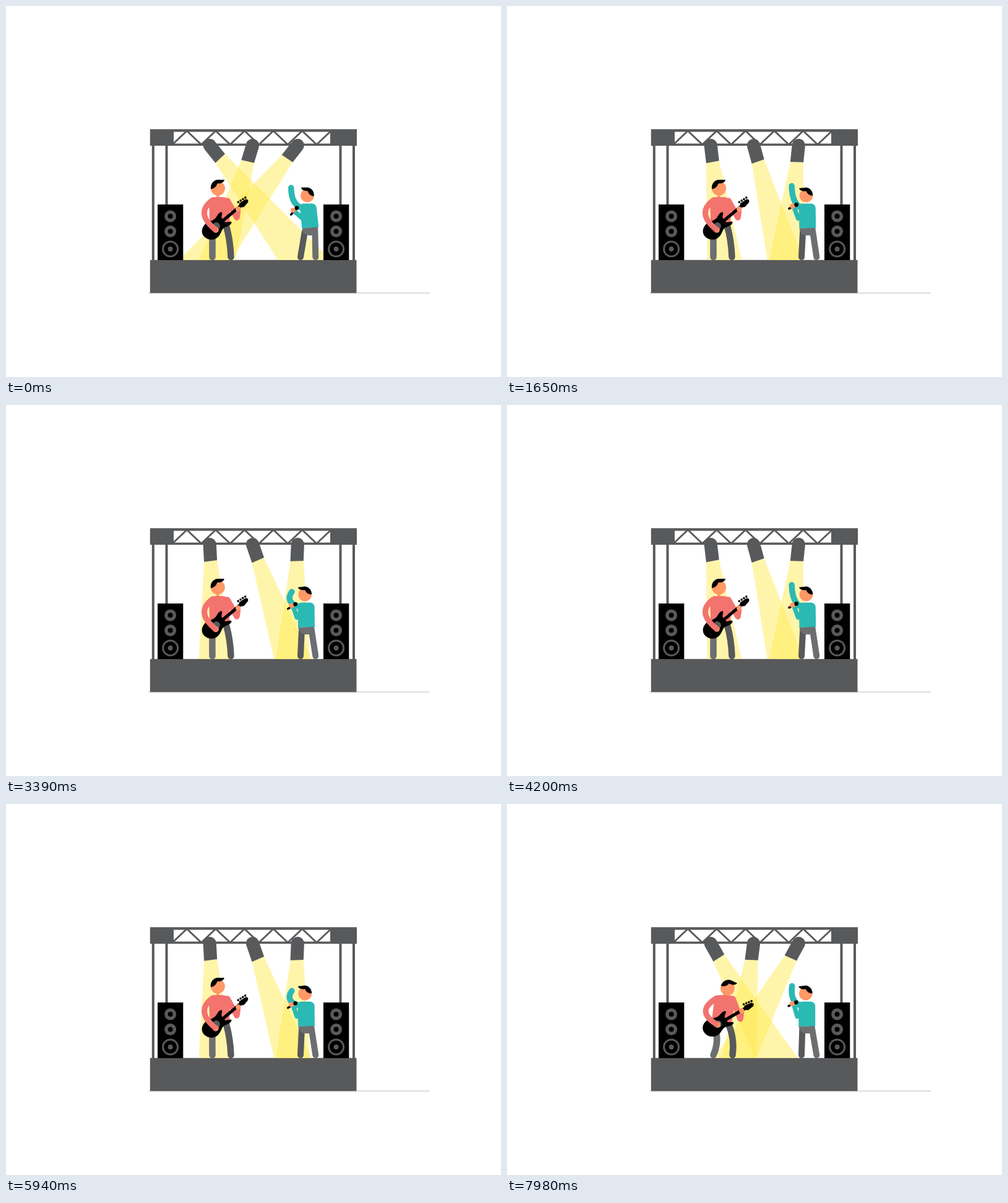
These frames come from a looping animation (800 by 600 pixels, 8000 ms). An HTML page:

```html
<!DOCTYPE html>
<html lang="en">
<head>
<meta charset="utf-8">
<title>Concert stage</title>
<style>
  html, body { margin: 0; width: 100%; height: 100%; overflow: hidden; background: #fff; }
  svg { display: block; width: 100vw; height: 100vh; }
</style>
</head>
<body>
<svg viewBox="0 0 800 600" xmlns="http://www.w3.org/2000/svg">
  <defs>
    <clipPath id="air"><rect x="233" y="200" width="334" height="211"/></clipPath>
    <path id="hair" d="M-11.5 1C-12.5-7-7-14 0-14L10.500-14C10-9.500 4-7.500-1-8C-2.500-2-7 .5-11.500 1Z"/>
  </defs>
  <path d="M231 464.200H684" stroke="#e1e1e1" stroke-width="2.400" stroke-linecap="round"/>
  <path d="M237.800 225V411M562 225V411M259.500 225V322M540.500 225V322" stroke="#58595b" stroke-width="4"/>
  <path fill="#58595b" d="M232.800 410.800H566.500V464.300H232.800Z"/>
  <path fill="#58595b" fill-rule="evenodd" d="M232.800 199.200H567V226H232.800ZM271 203.500V222.500H524V203.500Z"/>
  <path id="truss" fill="none" stroke="#58595b" stroke-width="2.800"/>
  <g id="beams" clip-path="url(#air)"></g>
  <g id="lamps"></g>
  <g id="speakers"></g>
  <g id="guitarist" fill="none" stroke-linecap="round" stroke-linejoin="round"></g>
  <g id="singer" fill="none" stroke-linecap="round" stroke-linejoin="round"></g>
</svg>
<script>
const GREY = '#58595b', LIGHT = '#6d6e70', RED = '#f3736f', TEAL = '#2bb9b4', SKIN = '#fe9867';
const LOOP = 8000, STEP = 30, BAR = 2550;

const $ = id => document.getElementById(id);
const set = (node, attrs) => { for (const k in attrs) node.setAttribute(k, attrs[k]); };

function add(parent, tag, attrs = {}) {
  const node = document.createElementNS('http://www.w3.org/2000/svg', tag);
  set(node, attrs);
  return parent.appendChild(node);
}

const dot = (g, r, fill) => add(g, 'circle', { r, fill });
const stroke = (g, color, width) => add(g, 'path', { stroke: color, 'stroke-width': width });
const place = (node, x, y, turn = 0) =>
  set(node, { transform: `translate(${x} ${y}) rotate(${turn})` });
const line = (node, ...p) => set(node, { d: 'M' + p.join(' ') });
const curve = (node, x, y, ...p) => set(node, { d: `M${x} ${y}Q${p.join(' ')}` });

// Angle of a motion that repeats a number of times per bar
const phase = (t, times, lead) => 2 * Math.PI * (t + lead) * times / BAR;

// Truss and speakers
let zigzag = 'M269 224';
for (let i = 1; i <= 11; i++) zigzag += `L${269 + i * 23.3} ${i % 2 ? 202 : 224}`;
set($('truss'), { d: zigzag });

for (const x of [245, 513]) {
  const g = add($('speakers'), 'g', { transform: `translate(${x} 321)` });
  add(g, 'rect', { width: 41.3, height: 90 });
  for (const y of [19, 43.5]) {
    place(dot(g, 9.5, GREY), 20.6, y);
    place(dot(g, 4, '#000'), 20.6, y);
  }
  place(dot(g, 13.5, GREY), 20.6, 72);
  place(dot(g, 10.5, '#000'), 20.6, 72);
  place(dot(g, 4, GREY), 20.6, 72);
}

// Spotlights: pivot, middle angle, swing direction
const lamps = [[329.2, 16.9, 1], [398.5, 5.1, -1], [471.3, -16.2, -1]].map(([x, mid, dir]) => ({
  x, mid, dir,
  beam: add($('beams'), 'path', { d: 'M-10.5 27.800L10.500 26.300L42 320H-42Z', fill: '#ffeb56', opacity: .5 }),
  body: add($('lamps'), 'path', { d: 'M-10.6 0A10.600 10.600 0 0 1 10.600 0V26.300L-10.600 27.800Z', fill: GREY })
}));

function moveLamps(t) {
  const swing = 22.3 * Math.cos(phase(t, 1, 70));
  for (const l of lamps)
    for (const part of [l.beam, l.body]) place(part, l.x, 225.4, -(l.mid + l.dir * swing));
}

function makeHead(parent, r, flip) {
  const g = add(parent, 'g');
  dot(g, r, SKIN);
  add(g, 'use', { href: '#hair', fill: '#000', transform: `scale(${flip * r / 11.5} ${r / 11.5})` });
  return g;
}

function makeGuitar(parent) {
  const g = add(parent, 'g', { fill: '#000' });
  add(g, 'path', { d: 'M-26 1C-27-9-18-15-9-14C-2-13 2-10 8-11C13-12 17-15 21-12C22-9 16-8 15-4' +
    'V4C17 8 23 7 23 11C18 15 12 10 6 10C0 11-4 16-12 15C-20 14-25 8-26 1Z' });
  add(g, 'path', { d: 'M14-2.500H50L52-4.500L64-3C68-1 66 3 63 3.500L54 5L50 2.500H14Z' });
  for (let i = 0; i < 4; i++) place(dot(g, 1.8, '#000'), 52 + i * 4.5, i * .6 - 7);
  dot(g, 6, GREY);
  return g;
}

const man = (g => ({
  legL: stroke(g, LIGHT, 10.5),
  legR: stroke(g, GREY, 10.5),
  neck: stroke(g, SKIN, 4.5),
  torso: add(g, 'path', { fill: RED }),
  head: makeHead(g, 11.5, 1),
  fret: stroke(g, RED, 9.5),
  guitar: makeGuitar(g),
  grip: dot(g, 4.2, SKIN),
  hand: dot(g, 4.8, SKIN),
  strum: stroke(g, RED, 9)
}))($('guitarist'));

// Three sways per bar, two strums per sway
function moveGuitarist(t) {
  const a = phase(t, 3, 25), strum = Math.cos(2 * a);
  const sway = .687 - .49 * Math.cos(a) - .22 * strum;
  const lean = 7 * sway, x = 328 + lean, y = 309, handY = 349.3 + 12.6 * strum;

  curve(man.legL, 333.5 + 4 * sway, 364, 333.5 + 9 * sway, 387, 333.5, 406);
  curve(man.legR, 356 + 2 * sway, 356, 362.5 + 5.5 * sway, 379, 363.5 + sway, 406);
  set(man.torso, { d: `M${329.500 + sway} 354L${x} ${y + 8}q1-8 9-8h13q10 0 12 10L${361 + 2 * sway} 354Z` });
  line(man.neck, 342.5 + 2 * lean, 298, 342.3 + 1.2 * lean, 310);
  place(man.head, 342.5 + 2 * lean, 295 + 3 * sway, 25 * sway);
  line(man.fret, 358 + lean, 315, 373 + 4 * sway, 342 + 5.5 * sway, 374.5 + 4 * sway, 332 + 5 * sway);
  place(man.grip, 375.3 + 4 * sway, 328.5 + 6 * sway);
  place(man.guitar, 340 + sway, 356, 10 * sway - 40);
  curve(man.strum, 334 + .7 * lean, 314, 299.5 + 6 * strum + 1.5 * sway, 334.5, 337.7, handY);
  place(man.hand, 339 + sway, handY + 1);
}

const vocal = (g => ({
  legL: stroke(g, GREY, 10),
  legR: stroke(g, LIGHT, 10),
  hips: add(g, 'path', { fill: LIGHT }),
  raised: stroke(g, TEAL, 9.5),
  torso: add(g, 'path', { fill: TEAL }),
  head: makeHead(g, 10.8, -1),
  arm: stroke(g, TEAL, 7.5),
  mic: stroke(g, '#000', 3.4),
  hand: dot(g, 4.1, SKIN),
  tip: dot(g, 3.3, '#000')
}))($('singer'));

// Four sways per bar; the raised arm pumps a little later than the body leans
function moveSinger(t) {
  const lean = Math.cos(phase(t, 4, 35)), pump = Math.sin(phase(t, 4, 0));
  const x = 473 + 2 * lean, waist = 474.8 + 3.8 * lean, waistR = waist + 26.8, waistY = 358 - lean;
  const tipX = 468.6 + 1.4 * lean, tipY = 323.7 + 3.1 * lean + .7 * pump;

  line(vocal.legL, 480 + 3 * lean, 365, 476, 406);
  line(vocal.legR, 496 + 3.6 * lean, 362, 500.3, 406);
  set(vocal.hips, { d: `M${waist} 359.500q2 11.500 11 11.500h8L${waistR} ${waistY}Z` });
  set(vocal.torso, { d: `M${waist} 359.800L${x} 325q0-5.500 7-5.500h12q7.500 0 8 7.500L${waistR} ${waistY}Z` });
  curve(vocal.raised, 476.5 + lean, 326.5, 458.5 + 2.5 * lean - 7.5 * pump, 320,
    460.8 + 1.2 * pump, 294.7 + 7.7 * pump - .7 * lean);
  place(vocal.head, 484.8 + 2.2 * lean, 306.7, 4 * lean - 4);
  line(vocal.arm, 465.8 + 1.3 * lean, 330 + 2.9 * lean, 474 + 5.5 * lean, 343.5, 482 + 2 * lean, 330);
  line(vocal.mic, 457.8 + 3 * lean, 332 + 5.6 * lean + 1.7 * pump, tipX, tipY);
  place(vocal.hand, 462.6 + 1.7 * lean, 326.6 + 4 * lean + .6 * pump);
  place(vocal.tip, tipX, tipY);
}

const start = performance.now();
function tick() {
  const now = (performance.now() - start) % LOOP;
  const t = Math.floor(now / STEP) * STEP;
  moveLamps(t);
  moveGuitarist(t);
  moveSinger(t);
  requestAnimationFrame(tick);
}
tick();
</script>
</body>
</html>
```
